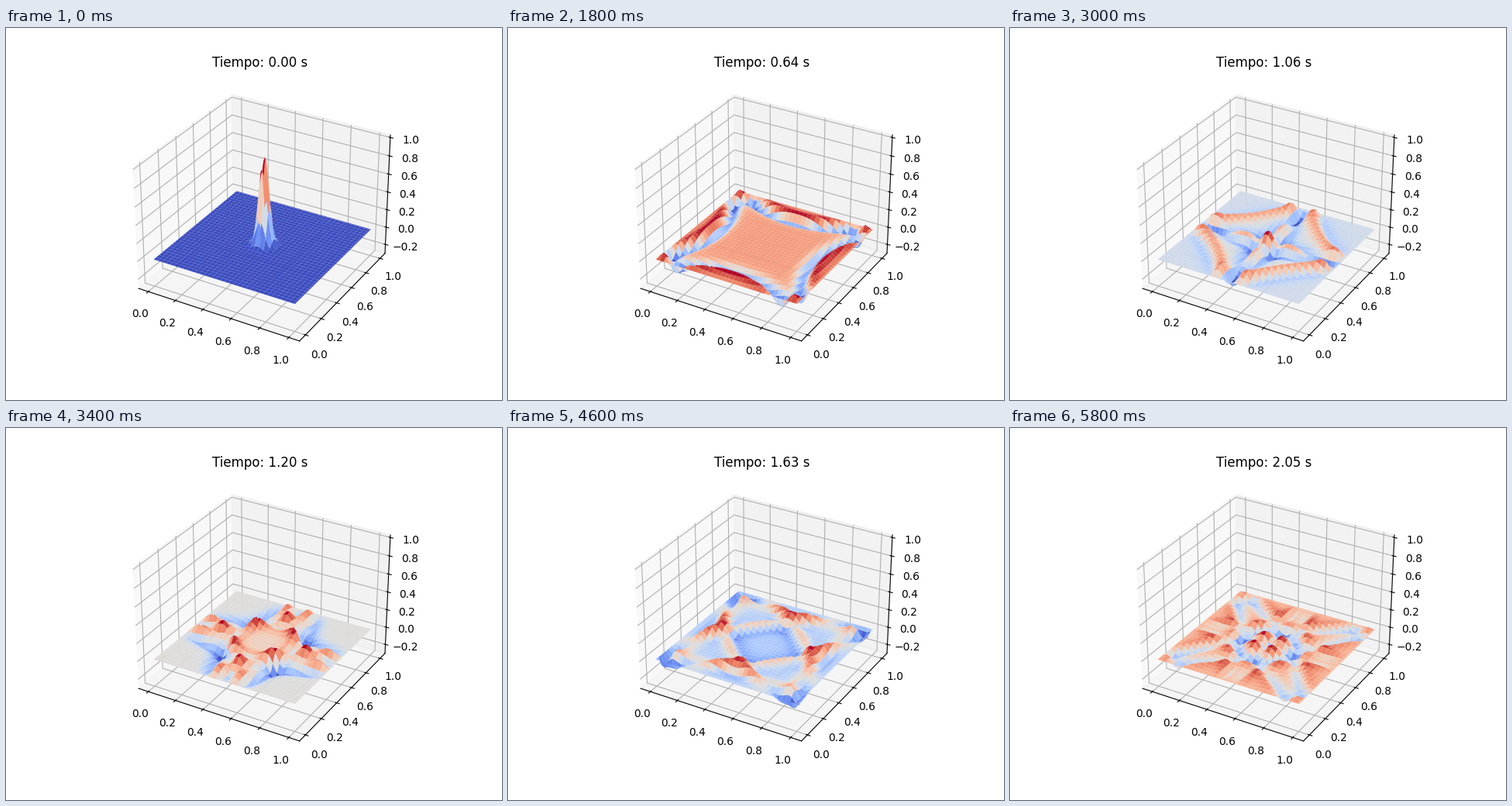
A matplotlib script for the animation above (6 s loop, 640 by 480 pixels).

```python
import numpy as np
import matplotlib.pyplot as plt
from matplotlib.animation import ArtistAnimation

N = 101                # grid points per side
FRAMES = 30
STEPS = 10             # time steps between frames
C = 1.0                # wave speed
SHARPNESS = 500        # of the initial pulse

x = np.linspace(0, 1, N)
dx = x[1] - x[0]
dt = dx / (C * np.sqrt(2))
X, Y = np.meshgrid(x, x)
r2 = (C * dt / dx) ** 2


def step(prev, cur):
    nxt = np.zeros_like(cur)
    lap = (cur[2:, 1:-1] + cur[:-2, 1:-1] + cur[1:-1, 2:] + cur[1:-1, :-2]
           - 4 * cur[1:-1, 1:-1])
    nxt[1:-1, 1:-1] = 2 * cur[1:-1, 1:-1] - prev[1:-1, 1:-1] + r2 * lap
    return cur, nxt


fig = plt.figure(figsize=(6.4, 4.8), dpi=100)
ax = fig.add_subplot(projection="3d")

u = np.exp(-SHARPNESS * ((X - 0.5) ** 2 + (Y - 0.5) ** 2))
prev, cur = u, u
artists = []
for i in range(FRAMES):
    surf = ax.plot_surface(X, Y, cur, cmap="coolwarm")
    title = ax.text2D(0.5, 1.02, f"Tiempo: {i * STEPS * dt:.2f} s",
                      transform=ax.transAxes, ha="center", fontsize=12)
    artists.append([surf, title])
    for _ in range(STEPS):
        prev, cur = step(prev, cur)

anim = ArtistAnimation(fig, artists, interval=200, repeat=True, repeat_delay=0)
plt.show()
```
